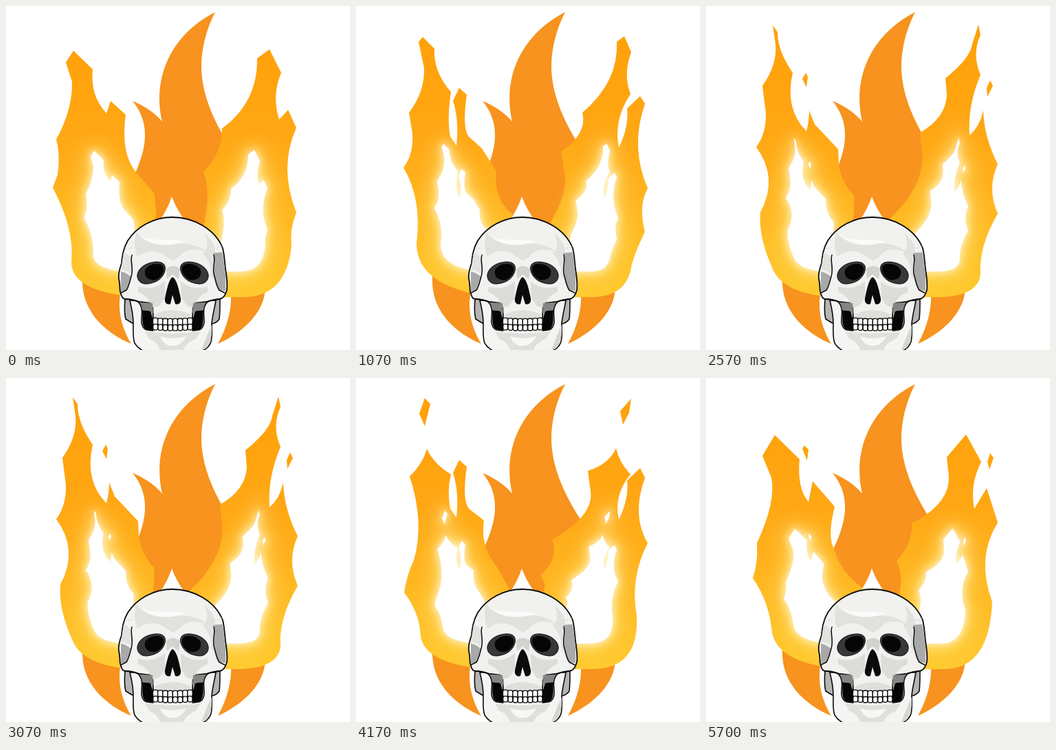
Animation of 500x500 px, one loop 5730 ms. Source, as an HTML page:

```html
<!DOCTYPE html>
<html lang="en">
<head>
<meta charset="utf-8">
<title>Burning skull</title>
<style>
html, body { margin: 0; width: 100%; height: 100%; overflow: hidden; background: #fff; }
svg { display: block; width: 500px; height: 500px; }
.line { fill: none; stroke: #0b0b0b; stroke-width: 1.5; stroke-linecap: round; stroke-linejoin: round; }
</style>
</head>
<body>
<svg viewBox="0 0 500 500">
  <defs>
    <linearGradient id="fire" gradientUnits="userSpaceOnUse" x1="0" y1="27" x2="0" y2="424">
      <stop offset="0" stop-color="#ffa008"/>
      <stop offset=".4" stop-color="#ffa714"/>
      <stop offset="1" stop-color="#ffca30"/>
    </linearGradient>
    <filter id="wide" x="-60%" y="-60%" width="220%" height="220%"><feGaussianBlur stdDeviation="14"/></filter>
    <filter id="soft" x="-50%" y="-50%" width="200%" height="200%"><feGaussianBlur stdDeviation="6"/></filter>
  </defs>

  <!-- still flame -->
  <path fill="#f7931e" fill-rule="evenodd" d="M304 9 C246 38 211 98 227 168 Q212 150 184 138 C208 168 206 200 190 238 C166 290 111 335 111 402 C112 446 146 476 182 491 C166 464 163 440 166 420 C172 370 225 325 241 277 C258 325 318 370 327 420 C328 440 322 466 308 491 C346 474 372 446 376 418 C384 340 356 262 326 205 C300 165 284 125 284 88 C284 60 292 32 304 9Z"/>

  <g id="flames"></g>

  <!-- skull: parts behind the jaw, jaw, then cranium and face -->
  <path fill="#b4b4b2" stroke="#0b0b0b" stroke-width="1.6" d="M173 426 C172 438 172 448 174 455 Q180 459 186 462 L299 462 Q306 461 310 455 C311 446 311 436 311 426Z"/>
  <path fill="#f4f4f2" stroke="#0b0b0b" stroke-width="1.6" d="M180 428 C183 440 185 450 185 462 C185 474 184 482 187 490 C190 495 193 498 199 501 L286 501 C292 498 296 494 298 488 C300 480 299 470 299 462 C300 450 303 440 305 428Z"/>
  <path fill="#dfe0dc" d="M202 473 Q242 479 283 473 L276 484 Q262 489 258 500 L224 500 Q220 488 208 484Z"/>
  <path fill="#f7f7f6" d="M224 480 Q242 486 262 480 Q255 494 242 494 Q229 494 224 480Z"/>
  <path fill="#d5d6d2" d="M299 464 Q292 478 284 500 L290 498 Q300 489 299 464Z"/>

  <path id="skull" fill="#f1f1ef" stroke="#0b0b0b" stroke-width="1.8" d="M242 307 C214 307 190 321 177 341 C170 353 169 364 168 374 C165 382 163 390 164 397 C166 404 165 410 166 415 C168 422 169 426 174 426 C182 426 188 428 194 430 L213 432 L214 456 L271 456 L272 432 L291 430 C297 428 303 427 310 426 C315 426 319 420 321 413 C322 404 321 396 320 389 C318 378 318 364 315 352 C304 324 272 307 242 307Z"/>
  <path fill="#e1e2de" d="M190 328 C196 342 214 346 238 345 C264 344 282 348 291 358 C276 352 262 352 252 364 L243 370 L232 364 C222 354 204 354 191 364 C186 352 186 340 190 328Z"/>
  <path fill="#fbfbfa" d="M196 334 C212 344 240 336 262 343 C240 348 214 352 196 334Z"/>
  <path fill="#e1e2de" d="M288 330 C300 340 308 350 301 372 L302 398 L298 392 C300 378 292 366 286 360 C294 352 294 342 288 330Z"/>
  <path fill="#e1e2de" d="M171 358 Q182 362 184 376 L182 390 Q172 382 167 384Z"/>
  <path fill="#a9a9a9" d="M301 359 C306 372 301 386 303 396 Q305 408 309 413 L319 414 L319 390 C317 380 317 368 314 358Z"/>
  <path fill="#a9a9a9" d="M167 386 Q176 388 182 394 Q179 406 176 413 L167 415Z"/>
  <path fill="#dcddd9" d="M192 408 Q216 414 231 400 L231 424 L222 436 L213 438 Q206 420 192 416Z"/>
  <path fill="#dcddd9" d="M293 408 Q269 414 254 400 L255 424 L263 436 L272 438 Q279 420 293 416Z"/>
  <path fill="#d2d3cf" d="M233 382 Q242 374 253 382 L251 397 L242 390 L234 397Z"/>
  <path fill="#dfe0dc" d="M217 448 Q242 436 268 448 L270 455 L215 455Z"/>
  <path fill="none" stroke="#c8c8c6" stroke-dasharray="2 2" d="M170 350 Q177 354 183 351 M315 348 Q308 354 301 351"/>

  <g id="half">
    <path fill="#383838" stroke="#0b0b0b" d="M191 390 C193 380 204 373 217 372 C230 371 234 378 230 388 C226 398 216 403 204 404 C195 404 190 398 191 390Z"/>
    <path fill="#060606" d="M202 384 C206 376 218 373 226 376 C233 381 228 394 218 398 C208 400 200 394 202 384Z"/>
    <path fill="#858583" d="M190 429 C198 433 206 430 213 432 L214 446 L198 446 C198 440 195 434 190 429Z"/>
    <path fill="#060606" d="M198 442 C202 444 209 441 211 446 L214 458 L214 472 L203 470 C196 464 199 452 198 442Z"/>
    <path class="line" d="M183 362 C180 370 186 382 182 393 C180 400 179 407 175 413 L167 417 M174 426 C182 426 188 428 192 430 C198 436 198 444 197 454 C196 464 200 470 205 471 L214 472"/>
  </g>
  <use href="#half" transform="translate(485) scale(-1 1)"/>
  <path fill="#0b0b0b" d="M242 394 C237 397 234 410 231 425 C230 432 235 435 239 433 L242 420 L246 433 C250 435 255 432 254 425 C251 410 248 397 242 394Z"/>
  <g id="teeth" fill="#fff" stroke="#0b0b0b" stroke-width="1.3"></g>
</svg>
<script>
const NS = 'http://www.w3.org/2000/svg';
const LOOP = 5730, STEPS = 6;

// One outline per drawn pose of each flame.
const left = [
  'M210 424Q95 420 95 372Q100 325 68 264L75 245Q79 215 73 194Q97 150 96 110L87 82L98 65L126 92Q122 130 146 156L152 138L174 158Q166 215 190 243L215 271Q218 285 218 303Z',
  'M210 424Q88 412 88 345Q96 280 69 235Q84 215 82 185L77 155Q100 125 99 90L91 52L97 45L114 62Q112 95 138 125Q132 165 137 190L146 203Q150 165 141 138L150 119L161 129Q154 178 164 190L183 207L204 240Q200 282 228 303Z',
  'M210 424Q112 424 96 380Q76 335 79 300Q106 250 73 205Q88 185 87 155L82 116Q104 85 101 55L97 28L104 38Q104 65 126 97Q114 150 146 182Q150 166 150 152L158 172L192 208L193 230Q196 254 215 276Q216 290 214 308ZM145 97L148 103L146 118L140 106Z',
  'M210 424Q95 420 80 360Q66 320 73 290Q108 235 75 173Q96 150 96 115L88 73L103 40L112 55Q102 110 139 160L150 140L180 172Q176 215 208 247Q200 280 210 300ZM153 203Q151 213 155 221Q157 212 153 203Z',
  'M210 424Q100 420 94 375Q92 340 70 312Q74 285 84 265Q100 210 78 143Q97 125 103 103Q114 126 138 140Q132 165 137 190L146 203Q150 165 141 138L150 119L161 129Q154 178 164 190L186 207Q180 245 205 275L222 305ZM92 52L100 29L108 38L100 70Z',
  'M210 424Q105 418 96 370Q92 325 68 291Q76 268 74 240Q102 180 95 145L82 113L100 83L136 118Q132 160 149 180L155 150L187 187Q176 230 186 248Q194 280 227 305ZM143 98L149 104L147 120L140 103Z'
];
const right = [
  'M270 424L290 305Q297 270 287 241Q314 215 314 178Q366 140 365 76L383 63L400 97Q386 130 397 165L410 151L422 177Q396 235 422 300Q412 325 415 348Q408 420 350 423Z',
  'M270 424L284 312Q306 275 304 248L298 212Q337 185 329 155Q382 110 379 52L390 44L400 67Q388 100 399 128Q374 165 382 206Q397 175 394 149L413 131L420 142Q398 205 424 265Q410 290 420 328Q402 365 399 385Q390 422 345 423Z',
  'M262 424L268 308Q312 268 315 222L311 184Q348 163 350 130L348 105Q385 75 387 55L396 27L399 42Q386 70 399 100Q380 145 383 188Q398 175 403 152Q404 190 424 230Q408 265 424 302Q396 350 399 390Q396 420 345 423ZM413 108L417 116L409 132L408 119Z',
  'M262 424L267 315Q266 285 290 262Q336 225 328 190L324 157Q376 140 370 66L397 40L398 58Q370 110 389 166L405 152L423 192Q404 230 424 272Q398 320 401 345Q410 422 345 423ZM388 204Q381 215 385 228Q391 215 388 204Z',
  'M262 424L272 310Q278 300 268 287Q296 262 285 235Q346 200 341 165L337 135Q368 125 378 102Q382 122 399 140Q374 170 382 206Q397 175 394 149L413 131L420 145Q400 200 424 240Q398 290 408 345Q412 422 345 423ZM384 48L400 30L397 50L388 68Z',
  'M270 424L282 310Q286 285 277 266Q301 240 299 211Q360 180 352 135L350 115L378 82L400 122Q383 155 390 190L408 160L424 210Q392 262 416 325Q412 420 350 423ZM413 109L418 116L412 133L409 122Z'
];

function add(parent, tag, attrs) {
  const el = parent.appendChild(document.createElementNS(NS, tag));
  for (const name in attrs) el.setAttribute(name, attrs[name]);
  return el;
}

// Body, two glows and the white core all share one outline.
function makeFlame(poses, coreX) {
  const root = document.getElementById('flames');
  const body = { fill: 'url(#fire)', 'fill-rule': 'evenodd' };
  const transform = `translate(${coreX} 178.5) scale(.49)`;
  const core = attrs => add(add(root, 'g', attrs), 'path', { transform, 'fill-rule': 'evenodd' });
  const parts = [
    add(root, 'path', body),
    core({ fill: '#ffeb8c', stroke: '#ffeb8c', 'stroke-width': 24, filter: 'url(#wide)', opacity: .75 }),
    core({ fill: '#fff8e0', stroke: '#fff8e0', 'stroke-width': 6, filter: 'url(#soft)', opacity: .85 }),
    core({ fill: '#fff' })
  ];
  return step => parts.forEach(p => p.setAttribute('d', poses[step]));
}

const flames = [makeFlame(left, 80), makeFlame(right, 173.3)];

const teeth = document.getElementById('teeth');
for (let i = 0; i < 8; i++) {
  const x = 213.5 + i * 7.2, sag = Math.sin((i + .5) / 8 * Math.PI) * 1.5;
  add(teeth, 'rect', { x, y: 453 + sag, width: 7.2, height: 10, rx: 2.5 });
  add(teeth, 'rect', { x: x + .3, y: 462 + sag, width: 6.7, height: 8.5, rx: 2.5 });
}

// Poses last 80 ms, shown on a 30 per second grid.
const start = performance.now();
let shown = -1;
function draw(now) {
  const t = Math.max(0, now - start) % LOOP;
  const tick = Math.floor(t * .03 + .15);
  const step = Math.floor(tick * 5 / 12) % STEPS;
  if (step !== shown) flames.forEach(show => show(step));
  shown = step;
  requestAnimationFrame(draw);
}
draw(start);
</script>
</body>
</html>
```
